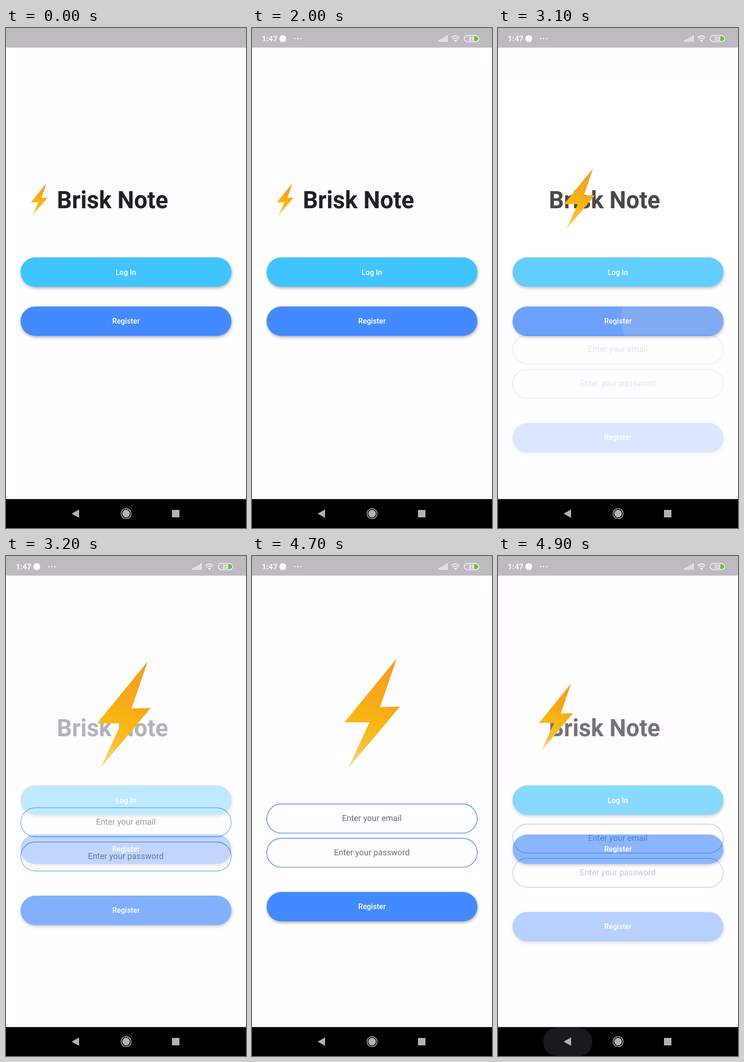
Recreate the animation shown at these times as an HTML page. Size 519 by 1079 pixels, loop 5 s.

```html
<!DOCTYPE html>
<html lang="en">
<head>
<meta charset="utf-8">
<title>Chat app welcome</title>
<style>
  html, body { margin: 0; width: 100%; height: 100%; overflow: hidden; background: #fefdff; }
  svg { display: block; width: 100%; height: 100%; font-family: Roboto, sans-serif; }
  .button { filter: drop-shadow(1.2px 3.5px 3px rgba(0, 0, 0, .3)); }
  .label { font-size: 16px; font-weight: 500; fill: #fff; text-anchor: middle; }
  .field { fill: none; stroke: #4484ec; stroke-width: 1.4; }
  .hint { font-size: 18px; fill: #727174; text-anchor: middle; }
  .title { font-size: 51px; font-weight: 700; fill: #212023; }
</style>
</head>
<body>
<svg viewBox="0 0 519 1079">
  <defs>
    <linearGradient id="gold" gradientUnits="userSpaceOnUse" x1="50" y1="-110" x2="-52" y2="118">
      <stop offset="0" stop-color="#f49f20"/>
      <stop offset=".35" stop-color="#f7a91a"/>
      <stop offset=".58" stop-color="#f9b711"/>
      <stop offset=".74" stop-color="#f9bf30"/>
      <stop offset="1" stop-color="#fddc95"/>
    </linearGradient>
    <rect id="pill" x="31.5" width="456" height="63.5" rx="31.75"/>
    <clipPath id="registerShape"><use href="#pill" y="601"/></clipPath>
  </defs>

  <rect width="519" height="1079" fill="#fefdff"/>
  <g id="welcome">
    <text class="title" x="110" y="389">Brisk Note</text>
    <use class="button" href="#pill" y="495" fill="#40c4ff"/>
    <use class="button" href="#pill" y="601" fill="#448aff"/>
    <g clip-path="url(#registerShape)">
      <use id="highlight" href="#pill" y="601" fill="#bcbcbc"/>
      <circle id="splash" cx="392" cy="625.5" fill="#c8c8c8"/>
    </g>
    <text class="label" x="259" y="532.5">Log In</text>
    <text class="label" x="259.5" y="638">Register</text>
  </g>

  <g id="signup">
    <rect width="519" height="1079" fill="#fefdff"/>
    <rect class="field" x="32" y="535.3" width="455" height="62.6" rx="31.3"/>
    <text class="hint" x="259" y="572">Enter your email</text>
    <rect class="field" x="32" y="609.2" width="455" height="62.4" rx="31.2"/>
    <text class="hint" x="259" y="646">Enter your password</text>
    <use class="button" href="#pill" y="725" fill="#448aff"/>
    <text class="label" x="259.5" y="762">Register</text>
  </g>

  <path id="bolt" fill="url(#gold)" d="M53.5-118.5 17.5-13.5 60.5-14.5-51.5 118.5-5.5 19.5-59.5 19.5Z"/>

  <rect width="519" height="42.3" fill="#bdbbbd"/>
  <g id="status" fill="#fbfafc">
    <text x="21" y="29" font-size="17" font-weight="600">1:47</text>
    <circle cx="66.5" cy="23" r="7.5"/>
    <circle cx="92.5" cy="23" r="1.6"/>
    <circle cx="99" cy="23" r="1.6"/>
    <circle cx="105.5" cy="23" r="1.6"/>
    <path d="M403.5 30v-4h2.4v4zM407.7 30v-6h2.4v6zM411.9 30v-8.5h2.4v8.5zM416.1 30v-11h2.4v11zM420.3 30v-14h2.4v14z"/>
    <g fill="none" stroke="#fbfafc" stroke-width="1.8">
      <path d="M431.5 20.8q8.5-7.4 17 0M434.3 24q5.7-4.8 11.4 0"/>
      <rect x="459" y="16.2" width="31" height="13.4" rx="6.7" stroke-width="1.5"/>
    </g>
    <path d="M436.8 26.6q3.2-2.4 6.4 0l-3.2 3.8z"/>
    <path d="M481.5 18H484a4.9 4.9 0 0 1 0 9.8h-2.5z" fill="#55c82c"/>
    <text x="474.3" y="27" font-size="11" font-weight="700" text-anchor="middle">22</text>
  </g>

  <rect y="1016.6" width="519" height="62.4" fill="#000"/>
  <rect id="backPress" x="98" y="1018" width="106" height="61" rx="29" fill="#1a191c"/>
  <g fill="#b4b2b5">
    <path d="M142 1048 158 1039V1057Z"/>
    <circle cx="259.7" cy="1048" r="8.2"/>
    <circle cx="259.7" cy="1048" r="10.8" fill="none" stroke="#b4b2b5" stroke-width="1.5"/>
    <rect x="359" y="1040" width="16" height="16"/>
  </g>
</svg>

<script>
const LOOP = 5000, STEP = 100;
const PUSH = 3014, POP = 4795, FLIGHT = 238;
// Boxes that hold the bolt on each page; both share the left edge.
const LEFT = 32;
const SMALL = { right: 111, top: 331, bottom: 410 };
const BIG = { right: 487, top: 207.5, bottom: 471.5 };
const el = id => document.getElementById(id);
const clamp = v => Math.min(1, Math.max(0, v));
const span = (t, start, length) => clamp((t - start) / length);
const mix = (a, b, p) => a + (b - a) * p;

function bezier(x1, y1, x2, y2) {
  const at = (a, b, u) => 3 * u * (1 - u) ** 2 * a + 3 * u * u * (1 - u) * b + u ** 3;
  return x => {
    let low = 0, high = 1;
    for (let i = 0; i < 24; i++) {
      const mid = (low + high) / 2;
      if (at(x1, x2, mid) < x) low = mid; else high = mid;
    }
    return at(y1, y2, (low + high) / 2);
  };
}
const fastOutSlowIn = bezier(.4, 0, .2, 1);
const easeIn = bezier(.42, 0, 1, 1);

// The top right corner follows an arc that leaves its start horizontally.
function flyBolt(from, to, p) {
  const dx = to.right - from.right, dy = to.top - from.top;
  const radius = (dx * dx + dy * dy) / (2 * Math.abs(dy));
  const angle = p * 2 * Math.asin(Math.hypot(dx, dy) / (2 * radius));
  const right = from.right + Math.sign(dx) * radius * Math.sin(angle);
  const top = from.top + Math.sign(dy) * radius * (1 - Math.cos(angle));
  const bottom = mix(from.bottom, to.bottom, p);
  const scale = Math.min(right - LEFT, bottom - top) / (BIG.bottom - BIG.top);
  el('bolt').setAttribute('transform',
    `translate(${(LEFT + right) / 2} ${(top + bottom) / 2}) scale(${scale})`);
}

function render(t) {
  const popping = t >= POP;
  const back = span(t, POP, FLIGHT);
  const shown = popping ? 1 - back : span(t, PUSH, FLIGHT);

  el('signup').setAttribute('opacity', easeIn(shown));
  el('signup').setAttribute('transform', `translate(0 ${270 * (1 - fastOutSlowIn(shown))})`);

  if (popping) flyBolt(BIG, SMALL, fastOutSlowIn(back));
  else flyBolt(SMALL, BIG, fastOutSlowIn(shown));

  const tap = span(t, 3000, 200), tapped = t >= 3000;
  el('highlight').setAttribute('opacity', tapped ? .1 * (1 - tap) : 0);
  el('splash').setAttribute('opacity', tapped ? .42 * (1 - tap) : 0);
  el('splash').setAttribute('r', mix(21, 230, tap));

  el('status').setAttribute('opacity', span(t, 300, 600));
  el('backPress').setAttribute('opacity', mix(.5, 1, span(t, 4800, 100)) * (t >= 4800));
}

// The screen is refreshed ten times a second.
function tick() {
  const t = performance.now() % LOOP;
  render(Math.floor(t / STEP) * STEP);
  requestAnimationFrame(tick);
}
tick();
</script>
</body>
</html>
```
